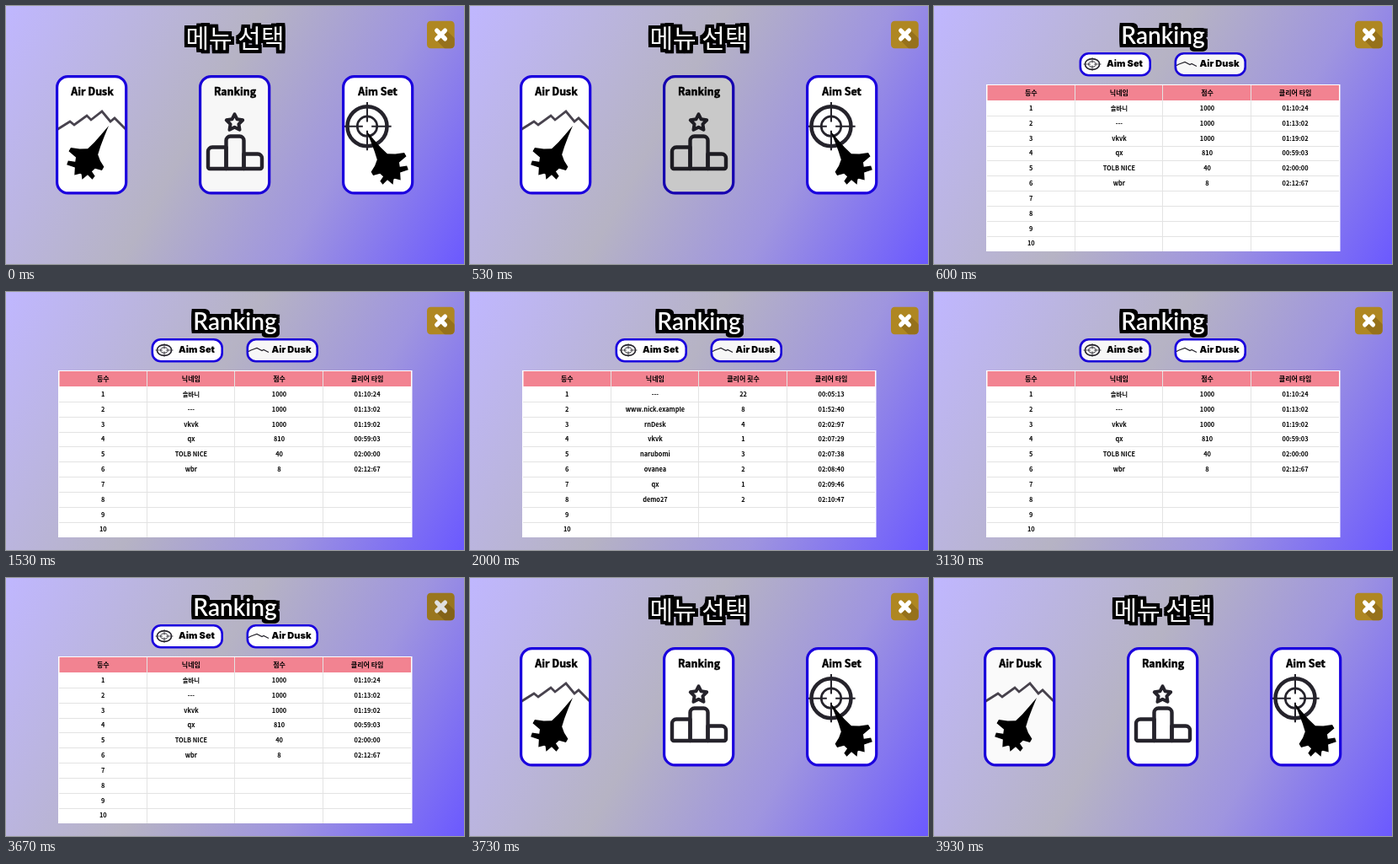
Animation, 544 px wide and 306 px high, one loop 3.99 s. Source, as an HTML page with a canvas:

```html
<!DOCTYPE html>
<html lang="ko">
<head>
<meta charset="utf-8">
<title>Menu and ranking</title>
<style>
html, body { margin: 0; width: 100%; height: 100%; overflow: hidden; }
canvas { display: block; width: 100vw; height: 100vh; }
</style>
</head>
<body>
<canvas id="stage" width="544" height="306"></canvas>
<script>
const ctx = document.getElementById('stage').getContext('2d');
const LOOP = 3990, FADE = 100;
const BLUE = '#1a00de', INK = '#25232b';
const KR = '"Noto Sans CJK KR", "Noto Sans CJK", sans-serif';
const CARD_FONT = `700 12.4px ${KR}`, TAB_FONT = '900 11px Inter, sans-serif';

// When the pointer rests on a button and when it is held down, in ms.
const pointer = {
  skyCard: { hover: [3860, LOOP] },
  rankCard: { hover: [-FADE, 600], press: [430, 600] },
  lockCard: { hover: [3740, 3800] },
  lockTab: { hover: [2500, 3330], press: [2610, 2750] },
  skyTab: { hover: [500, 2060], press: [1530, 1740] },
  close: { hover: [3530, 3630], press: [3560, 3630] }
};

const boards = {
  score: {
    value: '점수',
    rows: ['솔바니|1000|01:10:24', '---|1000|01:13:02', 'vkvk|1000|01:19:02',
      'qx|810|00:59:03', 'TOLB NICE|40|02:00:00', 'wbr|8|02:12:67']
  },
  clears: {
    value: '클리어 횟수',
    rows: ['---|22|00:05:13', 'www.nick.example|8|01:52:40', 'rnDesk|4|02:02:97',
      'vkvk|1|02:07:29', 'narubomi|3|02:07:38', 'ovanea|2|02:08:40',
      'qx|1|02:09:46', 'demo27|2|02:10:47']
  }
};

const ramp = (t, from) => Math.min(1, Math.max(0, (t - from) / FADE));
const pulse = (t, [from, to] = [0, 0]) => ramp(t, from) - ramp(t, to);
const brightness = (t, { hover, press }) => 1 - .03 * pulse(t, hover) - .18 * pulse(t, press);

function path(points, close) {
  ctx.beginPath();
  points.forEach(([x, y]) => ctx.lineTo(x, y));
  if (close) ctx.closePath();
}

function roundRect(x, y, w, h, r) {
  ctx.beginPath();
  ctx.roundRect(x, y, w, h, r);
}

function fill(color) {
  ctx.fillStyle = color;
  ctx.fill();
}

function stroke(width, color = INK) {
  ctx.lineWidth = width;
  ctx.strokeStyle = color;
  ctx.stroke();
}

function label(text, x, y, font, color = '#000') {
  ctx.font = font;
  ctx.fillStyle = color;
  ctx.fillText(text, x, y);
}

function heavyLabel(text, x, y) {
  label(text, x, y, CARD_FONT);
  ctx.lineWidth = .5;
  ctx.strokeStyle = '#000';
  ctx.strokeText(text, x, y);
}

function title(text, y, font) {
  for (let dx = -4; dx <= 4; dx += 2)
    for (let dy = -4; dy <= 4; dy += 2) label(text, 272 + dx, y + dy, font);
  label(text, 272, y, font, '#fff');
}

function button(x, y, w, h, r, border, tint, content) {
  const outline = () => roundRect(x + border / 2, y + border / 2, w - border, h - border, r);
  outline();
  fill('#fff');
  ctx.save();
  ctx.clip();
  content();
  ctx.restore();
  outline();
  stroke(border, BLUE);
  roundRect(x, y, w, h, r + border / 2);
  fill(`rgba(0,0,0,${1 - tint})`);
}

function background() {
  const g = ctx.createLinearGradient(0, 0, 544, 306);
  g.addColorStop(0, '#c0b7ff');
  g.addColorStop(.43, '#b6b3c4');
  g.addColorStop(.7, '#9f95df');
  g.addColorStop(1, '#6b59ff');
  ctx.fillStyle = g;
  ctx.fillRect(0, 0, 544, 306);
}

function closeButton(tint) {
  const cx = 516.6, cy = 34, arm = 4.9;
  const box = () => roundRect(500, 17.7, 32.7, 32.6, 4.5);
  box();
  fill('#af8722');
  ctx.save();
  ctx.clip();
  path([[cx + 7, cy - 5], [cx + 30, cy + 18], [cx + 18, cy + 30], [cx - 6, cy + 6]], true);
  fill('#96711b');
  ctx.restore();
  ctx.lineCap = 'round';
  for (const s of [-1, 1]) {
    path([[cx - arm, cy - arm * s], [cx + arm, cy + arm * s]]);
    stroke(5.2, '#fff');
  }
  ctx.lineCap = 'butt';
  box();
  fill(`rgba(0,0,0,${1 - tint})`);
}

// Half a plane as [distance from nose, half width]; the far half is foreshortened.
function jet(x, y, flip) {
  const half = [[0, 0], [14, 2.5], [26, 5], [36, 8], [41, 16], [45, 26], [50, 26],
    [52, 15], [57, 13], [60, 21], [65, 20], [63, 10], [71, 6], [66, 1]];
  const far = half.map(([a, b]) => [a, -.75 * b]).reverse();
  ctx.save();
  ctx.translate(x, y);
  ctx.scale(flip, 1);
  ctx.rotate(Math.PI * 2 / 3);
  path([...half, ...far], true);
  fill('#000');
  ctx.restore();
}

function mountains() {
  path([[60, 147], [76, 137], [81, 141], [96, 130], [101, 135], [114, 125], [124, 137], [129, 133], [143, 147]]);
  stroke(2.8, '#48434e');
}

function podium() {
  const base = 193;
  const step = (x, w, top, radii) => {
    roundRect(x, top, w, base - top, radii);
    stroke(4.4);
  };
  ctx.lineJoin = 'round';
  path(Array.from({ length: 10 }, (_, i) => {
    const r = i % 2 ? 5.2 : 10.2, a = i * Math.PI / 5 - Math.PI / 2;
    return [271.5 + r * Math.cos(a), 138.5 + r * Math.sin(a)];
  }), true);
  stroke(4);
  step(240, 21.5, 167.5, [5, 0, 0, 2]);
  step(282.5, 21.5, 175.5, [0, 5, 2, 0]);
  step(261.5, 21, 154.5, [5, 5, 0, 0]);
  ctx.lineJoin = 'miter';
}

function crosshair(x, y, rx, ry, w) {
  for (const [k, lw] of [[1, w], [.5, w * .6]]) {
    ctx.beginPath();
    ctx.ellipse(x, y, rx * k, ry * k, 0, 0, 7);
    stroke(lw);
  }
  for (const s of [-1, 1]) {
    path([[x + s * rx * .22, y], [x + s * rx * 1.22, y]]);
    stroke(w * .45);
    path([[x, y + s * ry * .22], [x, y + s * ry * 1.22]]);
    stroke(w * .45);
  }
}

function menu(tint) {
  title('메뉴 선택', 38, `400 30px ${KR}`);
  const card = (i, name, text, art) => button(59 + 170 * i, 82, 85.3, 141.5, 13, 3.2, tint(name), () => {
    heavyLabel(text, 102.5 + 169.5 * i, 101);
    art();
  });
  card(0, 'skyCard', 'Air Dusk', () => {
    mountains();
    jet(122, 142, 1);
  });
  card(1, 'rankCard', 'Ranking', podium);
  card(2, 'lockCard', 'Aim Set', () => {
    crosshair(429, 142.7, 23.5, 23.5, 4.5);
    jet(428, 148, -1);
  });
}

function table({ value, rows }) {
  const left = 63, top = 112, colW = 104.6, rowH = 17.85;
  const line = (cells, y, font) => cells.forEach((s, i) => label(s, left + colW * (i + .5), y, font));
  ctx.fillStyle = '#fff';
  ctx.fillRect(62, 93, 420.5, 198);
  ctx.fillStyle = '#f28391';
  ctx.fillRect(63.5, 94, 417.5, 18);
  ctx.fillStyle = '#e3e3e3';
  for (let i = 1; i < 10; i++) ctx.fillRect(left, Math.round(top + i * rowH), 418, 1);
  for (let i = 1; i < 4; i++) ctx.fillRect(Math.round(left + i * colW) - 1, 94, 1, 197);
  line(['등수', '닉네임', value, '클리어 타임'], 103, `700 8px ${KR}`);
  for (let i = 0; i < 10; i++) {
    const cells = rows[i] ? rows[i].split('|') : [];
    line([i + 1, ...cells], 121 + i * rowH, `700 7.4px ${KR}`);
  }
}

function ranking(t, tint) {
  title('Ranking', 36, '600 28px Lato, sans-serif');
  const tab = (x, name, art) => button(x, 55, 85.5, 28.5, 10, 2.6, tint(name), art);
  tab(172.5, 'lockTab', () => {
    crosshair(188, 69, 8.6, 6.4, 1.6);
    label('Aim Set', 226.5, 69, TAB_FONT);
  });
  tab(285.5, 'skyTab', () => {
    path([[287, 71], [291, 69], [298, 66.5], [304, 69.5], [306, 68.5], [312, 71.5]]);
    stroke(1.2);
    label('Air Dusk', 339, 69, TAB_FONT);
  });
  table(t >= 1930 && t < 2930 ? boards.clears : boards.score);
}

function draw(now) {
  const t = now % LOOP;
  const tint = name => brightness(t, pointer[name]);
  ctx.textAlign = 'center';
  ctx.textBaseline = 'middle';
  background();
  if (t >= 600 && t < 3730) ranking(t, tint);
  else menu(tint);
  closeButton(tint('close'));
}

const start = performance.now();
function tick() {
  draw(performance.now() - start);
  requestAnimationFrame(tick);
}
tick();
</script>
</body>
</html>
```
